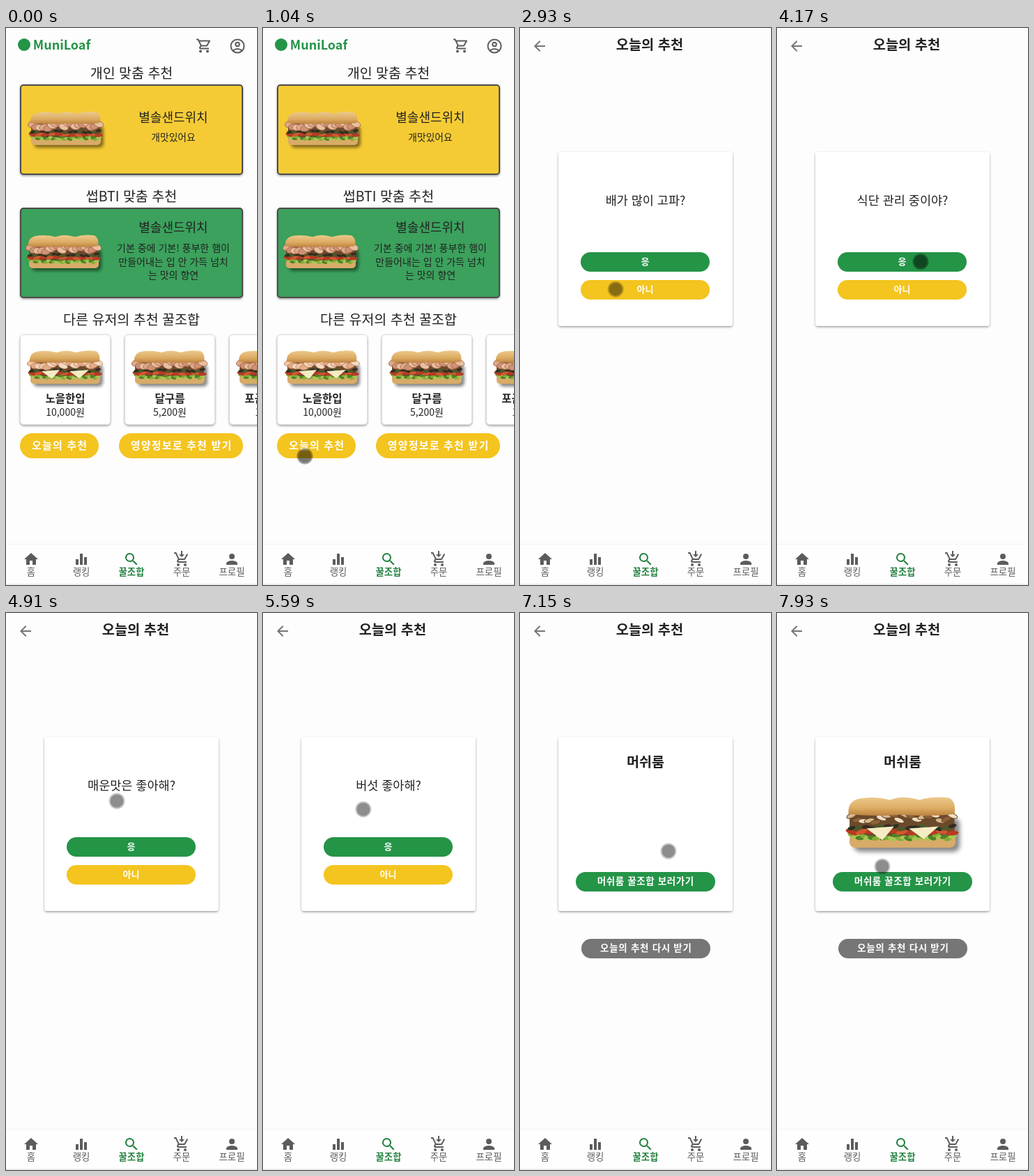
Write an HTML page that moves like this. It is 360x800 px and loops after 8000 ms.

```html
<!DOCTYPE html>
<html lang="ko">
<head>
<meta charset="utf-8">
<style>
  html, body { margin: 0; width: 100%; height: 100%; overflow: hidden; background: #fdfdfd; }
  svg { display: block; width: 100%; height: 100%; }
  text { font-family: "Noto Sans CJK KR", "Noto Sans CJK", "Noto Sans", sans-serif; text-anchor: middle; }
</style>
</head>
<body>
<svg id="stage" viewBox="0 0 360 800"></svg>
<script>
const LOOP = 8000;
const INK = '#222', GREY = '#5c5c5c', GREEN = '#249447', YELLOW = '#f4c41f';

// Text centred on (x, y)
const label = (x, y, size, str, { fill = INK, weight = 400, gap = 0 } = {}) =>
  `<text x="${x}" y="${y + size * .37}" font-size="${size}" font-weight="${weight}" fill="${fill}" letter-spacing="${gap}">${str}</text>`;
const box = (x, y, w, h, rx, fill, extra = '') =>
  `<rect x="${x}" y="${y}" width="${w}" height="${h}" rx="${rx}" fill="${fill}" ${extra}/>`;
const icon = (x, y, d, fill = GREY) => `<path transform="translate(${x} ${y})" d="${d}" fill="${fill}"/>`;
const pill = (x, y, w, h, fill, str, size, gap = 0) =>
  box(x, y, w, h, h / 2, fill) +
  label(x + w / 2 + gap / 2, y + h / 2 - .5, size, str, { fill: '#fff', weight: 700, gap });

const WHEELS = 'M7 18a2 2 0 100 4 2 2 0 000-4zM17 18a2 2 0 100 4 2 2 0 000-4z';
const ICONS = {
  cart: 'M15.55 13c.75 0 1.41-.41 1.75-1.03l3.58-6.49c.37-.66-.11-1.48-.87-1.48H5.21l-.94-2H1v2h2l3.6 7.59-1.35 2.44C4.52 15.37 5.48 17 7 17h12v-2H7l1.1-2zM6.16 6h12.15l-2.76 5H8.53z' + WHEELS,
  order: 'M15.55 13c.75 0 1.41-.41 1.75-1.03l3.86-7.01L19.42 4l-3.87 7H8.53L4.27 2H1v2h2l3.6 7.59-1.35 2.45C4.5 15.4 5.5 17 7 17h12v-2H7.2l.9-2zM11 0h2v5h3l-4 4-4-4h3z' + WHEELS,
  home: 'M10 20v-6h4v6h5v-8h3L12 3 2 12h3v8z',
  chart: 'M10 20h4V4h-4zM4 20h4v-8H4zM16 9v11h4V9z',
  search: 'M15.5 14h-.79l-.28-.27A6.5 6.5 0 109.5 16c1.61 0 3.09-.59 4.23-1.57l.27.28v.79l5 4.99L20.49 19zm-6 0a4.5 4.5 0 110-9 4.5 4.5 0 010 9z',
  person: 'M12 12a4 4 0 100-8 4 4 0 000 8zm0 2c-2.67 0-8 1.34-8 4v2h16v-2c0-2.66-5.33-4-8-4z',
  back: 'M20 11H7.83l5.59-5.59L12 4l-8 8 8 8 1.41-1.41L7.83 13H20z'
};

const FILLINGS = {
  ham: { colors: ['#dda98a', '#cf9273', '#e8bf9f'], line: '#9c5a40', rx: 7, ry: 4.5 },
  shrimp: { colors: ['#efc6a6', '#e4ab86', '#f3d9c2'], line: '#b9795a', rx: 7, ry: 4, cheese: true },
  mushroom: { colors: ['#d8b98f', '#8c6239', '#efe0c4'], line: '#6b4526', rx: 5, ry: 2.2, cheese: true }
};

// Drawn in a 108 x 50 space
function sandwich(x, y, scale, kind) {
  const { colors, line, rx, ry, cheese } = FILLINGS[kind];
  let seed = 7;
  const rnd = () => (seed = seed * 16807 % 2147483647) / 2147483647;
  const row = (n, cy, jitter, a, b, fills, extra = '') => Array.from({ length: n }, (_, i) => {
    const cx = 6 + 95 * i / (n - 1), dy = (rnd() - .5) * jitter, turn = (rnd() - .5) * 50;
    return `<ellipse rx="${a}" ry="${b}" fill="${fills[i % fills.length]}" ${extra}
      transform="translate(${cx} ${cy + dy}) rotate(${turn})"/>`;
  }).join('');
  return `<g transform="translate(${x} ${y}) scale(${scale})">
    ${box(8, 20, 100, 32, 6, '#0007', 'filter="url(#blur)"')}
    ${box(4, 35, 100, 13, 5, '#d8ab68')}
    ${box(4, 14, 99, 24, 3, '#6b4a2c')}
    ${row(26, 38, 4, 4, 2, ['#7fae35', '#a5c854', '#4f8228'])}
    ${row(11, 33, 3, 6, 2.2, ['#b93a22', '#d4552f'])}
    ${row(15, 29, 3, 4, 1.8, ['#26331f', '#4a5a2a', '#382a22'])}
    ${row(18, 21, 8, rx, ry, colors, `stroke="${line}" stroke-width=".7"`)}
    ${cheese ? '<path d="M20 30l26-2-11 13zM60 30l28-2-14 12z" fill="#f6ecc4"/>' : ''}
    <path d="M3 16Q2 5 12 2 26-1 42 3 54-2 70 3 82-1 98 1 105 5 103 16 90 19 52 17 20 19 3 16z" fill="url(#bun)"/>
  </g>`;
}

const heading = (y, str) => label(180, y, 19.5, str, { weight: 500 });
const feature = (y, fill) => box(21, y + 1, 318, 128, 4, fill, 'stroke="#4b4b4b" stroke-width="2" filter="url(#drop)"');
const combo = (x, kind, name, price) =>
  box(x + .5, 440.5, 129, 129, 5, '#fff', 'stroke="#ddd" filter="url(#drop)"') +
  sandwich(x + 11, 463, 1, kind) +
  label(x + 65, 532, 15.5, name, { weight: 700 }) + label(x + 65, 552, 14, price);

const home = `
  <circle cx="26" cy="24" r="9" fill="${GREEN}"/>
  ${label(80, 24, 18, 'MuniLoaf', { fill: GREEN, weight: 700 })}
  ${icon(272, 13.5, ICONS.cart)}
  <g fill="none" stroke="${GREY}" stroke-width="2"><circle cx="332" cy="26" r="9.5"/>
    <circle cx="332" cy="23.5" r="2.8"/><path d="M325.5 32.500q6.500-5 13 0"/></g>
  ${heading(65, '개인 맞춤 추천')}
  ${feature(81, '#f5cb36')}${sandwich(32, 120, 1, 'ham')}
  ${label(240, 128, 18, '별솔샌드위치', { weight: 500 })}${label(240, 157, 13.8, '개맛있어요')}
  ${heading(242, '썹BTI 맞춤 추천')}
  ${feature(258, '#3ba15b')}${sandwich(29, 297, 1, 'ham')}
  ${label(240, 286, 18, '별솔샌드위치', { weight: 500 })}
  ${['기본 중에 기본! 풍부한 햄이', '만들어내는 입 안 가득 넘치', '는 맛의 향연'].map((s, i) => label(240, 316 + i * 19.5, 14, s)).join('')}
  ${heading(419, '다른 유저의 추천 꿀조합')}
  ${combo(20, 'shrimp', '노을한입', '10,000원')}
  ${combo(170, 'ham', '달구름', '5,200원')}
  ${combo(320, 'ham', '포근샌드위치', '10,000원')}
  ${pill(20, 582, 113, 36, YELLOW, '오늘의 추천', 15, 1.2)}
  ${pill(162, 582, 178, 36, YELLOW, '영양정보로 추천 받기', 15, 1.2)}`;

const modal = content => icon(16, 14, ICONS.back, '#757575') +
  label(186, 24, 19.8, '오늘의 추천', { weight: 700 }) +
  box(55, 178, 250, 250, 4, '#fff', 'filter="url(#drop)"') + content;

const intro = modal(
  label(180, 212, 17.4, `오늘의 <tspan fill="#efc02f">추천</tspan>`, { fill: GREEN, weight: 700 }) +
  ['간단한 질문의 답변을 통해', '오늘 먹을 샌드위치 메뉴를', '추천 받을 수 있습니다.'].map((s, i) => label(180, 272 + i * 24, 17.2, s)).join('') +
  pill(87, 370, 185, 28, GREEN, '시작하기', 13.5));

const question = str => modal(label(180, 248, 17.5, str) +
  pill(87, 322, 185, 28, GREEN, '응', 13) + pill(87, 362, 185, 28, YELLOW, '아니', 13));

const result = modal(label(180, 214, 19.6, '머쉬룸', { weight: 700 }) +
  `<g id="photo">${sandwich(98, 264, 1.52, 'mushroom')}</g>` +
  pill(80, 372, 200, 28, GREEN, '머쉬룸 꿀조합 보러가기', 13.5, .6) +
  pill(88, 468, 185, 28, '#757675', '오늘의 추천 다시 받기', 13.5, .7));

const SCREENS = [
  [0, home], [1450, intro], [2430, question('배가 많이 고파?')], [3400, question('식단 관리 중이야?')],
  [4250, question('매운맛은 좋아해?')], [5460, question('버섯 좋아해?')], [6400, result]
];

const TABS = [['home', '홈'], ['chart', '랭킹'], ['search', '꿀조합'], ['order', '주문'], ['person', '프로필']];
const nav = box(0, 742, 360, 58, 0, '#fefefe', 'filter="url(#drop)"') + box(0, 798, 360, 2, 0, '#eee') +
  TABS.map(([name, str], i) => {
    const x = 36 + i * 72, active = name === 'search', fill = active ? '#23823f' : GREY;
    return icon(x - 12, 751, ICONS[name], fill) + label(x, 781, 13.4, str, { fill, weight: active ? 700 : 400 });
  }).join('');

const stage = document.getElementById('stage');
stage.innerHTML = `
  <defs>
    <filter id="blur" x="-20%" y="-30%" width="140%" height="170%"><feGaussianBlur stdDeviation="2"/></filter>
    <filter id="drop" x="-10%" y="-10%" width="120%" height="125%">
      <feDropShadow dx="0" dy="1.5" stdDeviation="1.5" flood-opacity=".38"/></filter>
    <linearGradient id="bun" x2="0" y2="1"><stop stop-color="#ecc98c"/><stop offset=".6" stop-color="#dcab62"/>
      <stop offset="1" stop-color="#bd8340"/></linearGradient>
  </defs>
  ${box(0, 0, 360, 800, 0, '#fdfdfd')}
  ${SCREENS.map(([, content]) => `<g class="screen">${content}</g>`).join('')}
  ${nav}
  <g id="status">${box(0, 777, 118, 21, 0, '#81868a', 'opacity=".95"')}
    <text x="5" y="792" font-size="12" fill="#fff" style="text-anchor:start;font-family:'Open Sans',sans-serif">j7a105.p.ssafy.io...</text></g>
  <g id="cursor"><circle r="11.500"/><circle r="9.500"/></g>`;

const screens = [...stage.querySelectorAll('.screen')];
const [photo, status, cursor] = ['photo', 'status', 'cursor'].map(id => document.getElementById(id));

// Pointer path: [time, x, y]
const PATH = [
  [70, 268, 757], [480, 160, 665], [760, 86, 602], [900, 90, 600], [1040, 60, 615], [1780, 60, 616],
  [1920, 127, 550], [2250, 164, 384], [2700, 164, 382], [3070, 121, 371], [3340, 121, 378],
  [3540, 121, 392], [3750, 121, 392], [4120, 206, 336], [4250, 206, 335], [4560, 206, 332],
  [4850, 159, 270], [5000, 159, 270], [5330, 206, 332], [5460, 206, 332], [5590, 144, 282],
  [5710, 129, 277], [5990, 129, 277], [6240, 213, 347], [6400, 213, 347], [6540, 213, 342],
  [7150, 213, 342], [7860, 151, 364], [8000, 151, 364]
];
const PRESSES = [[1000, 1300], [2330, 2430], [3300, 3400], [4130, 4250], [5370, 5460], [6310, 6400]];

const show = (el, on) => { el.style.display = on ? '' : 'none'; };

function draw(t) {
  const current = SCREENS.findLastIndex(([start]) => t >= start);
  screens.forEach((el, i) => show(el, i === current));
  show(photo, t >= 7400);
  show(status, t >= 1450 && t < 2100);
  show(cursor, t >= 70);
  if (t < 70) return;

  const i = PATH.findIndex(([end]) => end > t);
  const [t0, x0, y0] = PATH[i - 1], [t1, x1, y1] = PATH[i], k = (t - t0) / (t1 - t0);
  cursor.setAttribute('transform', `translate(${x0 + (x1 - x0) * k} ${y0 + (y1 - y0) * k})`);
  const pressed = PRESSES.some(([a, b]) => t >= a && t < b);
  cursor.children[0].setAttribute('fill-opacity', pressed ? .34 : .22);
  cursor.children[1].setAttribute('fill-opacity', pressed ? .27 : .29);
}

const begin = performance.now();
function frame() {
  draw((performance.now() - begin) % LOOP);
  requestAnimationFrame(frame);
}
frame();
</script>
</body>
</html>
```
